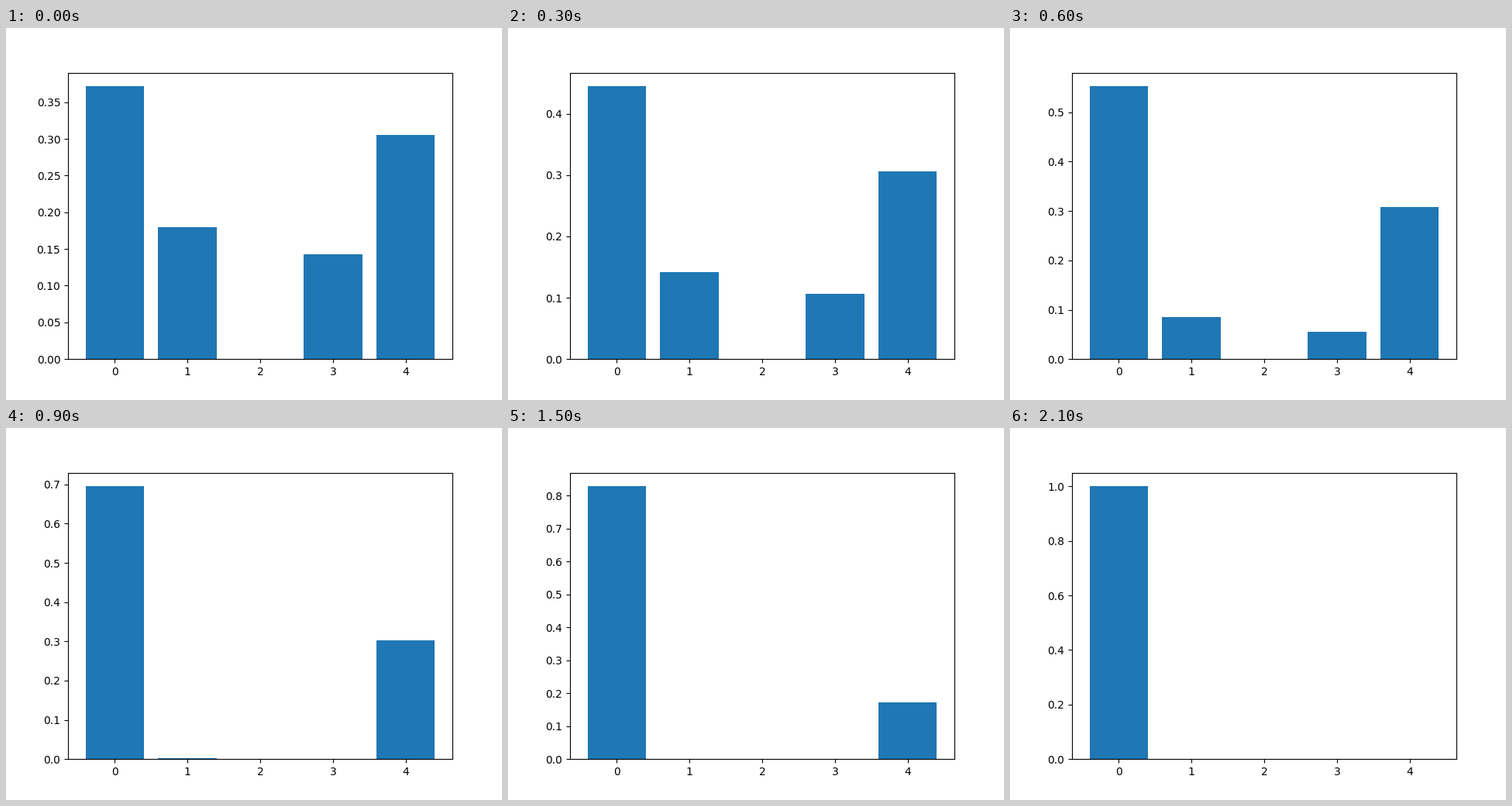
Write a matplotlib script that moves like this. It is 640 px wide and 480 px high and loops after 8 s.

```python
import matplotlib.pyplot as plt
from matplotlib.animation import FuncAnimation

LOOP_MS = 8000
TICK_MS = 50
STEP_MS = 150
LAST_STEP = 14


def decay(start, drop, rate, k):
    """Falls faster and faster from start until it is empty."""
    return max(0, start - drop * (rate ** k - 1))


def shares(k):
    """Heights of the five bars at step k; bar 0 gains what the rest lose."""
    one = decay(.18, .0831, 1.21, k)
    three = decay(.1428, .0772, 1.21, k)
    # Bar 4 creeps up until bars 1 and 3 are used up, then shrinks too.
    four = min(.3055 + .0006 * k, decay(.3025, .2626, 1.106, k - 6))
    return [1 - one - three - four, one, 0, three, four]


fig, ax = plt.subplots(figsize=(6.4, 4.8), dpi=100)
bars = ax.bar(range(5), shares(0), color="#1f77b4")


def draw(i):
    heights = shares(min(i * TICK_MS // STEP_MS, LAST_STEP))
    for bar, h in zip(bars, heights):
        bar.set_height(h)
    ax.set_ylim(0, 1.05 * max(heights))
    return bars


anim = FuncAnimation(fig, draw, frames=LOOP_MS // TICK_MS, interval=TICK_MS,
                     init_func=lambda: draw(0), repeat=True, repeat_delay=0)
plt.show()
```
